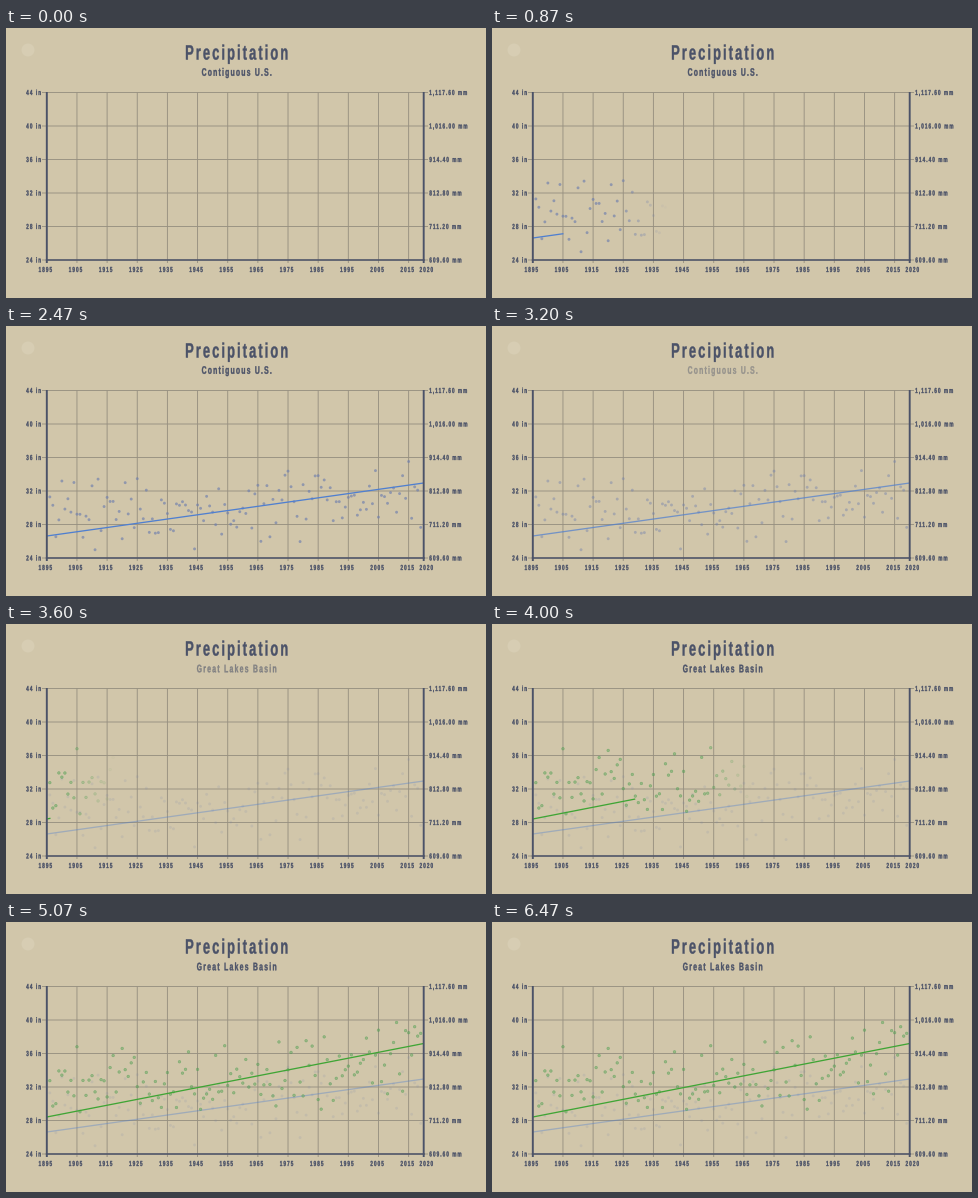
These frames come from a looping animation (480 px wide and 270 px high, 7.39 s). A matplotlib script:

```python
import numpy as np
import matplotlib.pyplot as plt
from matplotlib.animation import FuncAnimation
from matplotlib.colors import to_rgb
from matplotlib.patches import Circle, PathPatch
from matplotlib.path import Path
from matplotlib.textpath import TextPath

W, H, DPI = 480, 270, 100
LOOP, FRAMES = 7390, 111
STEP = LOOP / FRAMES
PX = 72 / DPI

PAPER, INK, GRID, BADGE = "#d1c6aa", "#4b5268", "#979080", "#d7cdb3"
BLUE, GREEN = "#4f7fd0", "#3fa535"
BLUE_DOT, GREEN_DOT = "#6f7fae", "#4d9f50"

FACE = dict(family="Liberation Sans", weight="bold")
CONDENSE = 0.62

LEFT, RIGHT, TOP, BOTTOM = 40.8, 417.7, 64.5, 232.0
YEAR = (RIGHT - LEFT) / 125
ERAS = [1896, 1935, 1970, 1995, 2019]
SECOND = 2870  # start of the second data set

fig = plt.figure(figsize=(W / DPI, H / DPI), dpi=DPI, facecolor=PAPER)
ax = fig.add_axes([0, 0, 1, 1])
ax.set(xlim=(0, W), ylim=(H, 0))
ax.axis("off")


def year_x(year):
    return LEFT + (year - 1895) * YEAR


def right_edge(s, size):
    return TextPath((0, 0), s, size=size, prop=FACE).get_extents().x1


def label(x, y, s, size, track, align=0.5):
    """Condensed, letter-spaced text on baseline y."""
    verts, codes = [], []
    for i, ch in enumerate(s):
        if ch == " ":
            continue
        glyph = TextPath((0, 0), ch, size=size, prop=FACE)
        start = right_edge(s[:i + 1], size) - right_edge(ch, size)
        shift = start * CONDENSE + i * track * size
        verts.append(glyph.vertices * [CONDENSE, -1] + [shift, 0])
        codes.append(glyph.codes)
    path = Path(np.concatenate(verts), np.concatenate(codes))
    box = path.get_extents()
    path.vertices += [x - box.x0 - align * box.width, y]
    return ax.add_patch(PathPatch(path, fc=INK, ec=INK, lw=0.35 * PX,
                                  zorder=5, snap=False))


def rule(x0, y0, x1, y1, color=GRID, width=0.9, z=1):
    ax.plot([x0, x1], [y0, y1], color=color, lw=width * PX, zorder=z,
            solid_capstyle="butt", snap=False)


def draw_scale():
    for inches in range(24, 45, 4):
        y = BOTTOM - (inches - 24) * (BOTTOM - TOP) / 20
        rule(36, y, 422, y)
        label(34.8, y + 2.5, f"{inches} in", 7.3, 0.155, 1)
        label(423.5, y + 2.5, f"{inches * 25.4:,.2f} mm", 7.3, 0.155, 0)
    for year in range(1895, 2016, 10):
        x = year_x(year)
        rule(x, TOP, x, 235)
        label(x - 1.4, 244, str(year), 7.3, 0.155)
    label(420.3, 244, "2020", 7.3, 0.155)
    for x in (LEFT, RIGHT):
        rule(x, TOP - 0.5, x, 235, INK, 1.9, 4)
    rule(LEFT - 1, BOTTOM, RIGHT + 1, BOTTOM, INK, 1.5, 4)


def rainfall(seed, means, spread):
    """Random yearly heights around a drifting mean."""
    years = np.arange(ERAS[0], ERAS[-1] + 1)
    noise = np.random.default_rng(seed).normal(0, spread, len(years))
    noise = np.clip(noise, -2.3 * spread, 2.3 * spread)
    return year_x(years), np.interp(years, ERAS, means) + noise


def ease(u):
    u = np.clip(u, 0, 1)
    return (u + u * u * (3 - 2 * u)) / 2


class Series:
    def __init__(self, points, trend, color, dot, delay, ring, z):
        self.x, y = points
        self.trend, self.delay = trend, delay
        size = 2.6 if ring else 2.9
        self.dots = ax.scatter(self.x, y, s=(size * PX) ** 2,
                               linewidths=0.6 * PX if ring else 0, zorder=z)
        self.fill, self.edge = (0.42, 0.55) if ring else (0.66, 0)
        self.rgb = to_rgb(dot)
        self.line, = ax.plot([], [], color=color, lw=1.3 * PX, zorder=z + 0.5,
                             solid_capstyle="butt", snap=False)

    def tint(self, alpha):
        return [(*self.rgb, a) for a in alpha]

    def update(self, t, dot_level=1, line_level=1):
        t -= self.delay
        front = np.interp(t, [580, 870, 1330, 1730], [40, 178, 325, 475])
        shown = np.clip((front - self.x) / 50, 0, 1) * dot_level
        self.dots.set_facecolor(self.tint(shown * self.fill))
        self.dots.set_edgecolor(self.tint(shown * self.edge))
        p = ease((t - 700) / 1360)
        y0, y1 = self.trend
        self.line.set_data([LEFT, LEFT + p * (RIGHT - LEFT)],
                           [y0, y0 + p * (y1 - y0)])
        self.line.set_alpha(line_level)
        self.line.set_visible(p > 0)


ax.add_patch(Circle((22, 22), 6.5, fc=BADGE, lw=0))
draw_scale()
label(230.7, 31.6, "Precipitation", 20.8, 0.1)
nation_name = label(230.6, 47.8, "Contiguous U.S.", 10.9, 0.115)
lakes_name = label(230.6, 48.3, "Great Lakes Basin", 10.9, 0.12)
nation = Series(rainfall(4, [182, 191, 179, 172, 163], 17), (210, 157),
                BLUE, BLUE_DOT, 0, False, 2)
lakes = Series(rainfall(11, [158, 166, 150, 148, 118], 19), (195, 121.5),
               GREEN, GREEN_DOT, SECOND, True, 3)


def update(i):
    t = i * STEP
    fade = np.interp(t, [SECOND, 3600], [0, 1])
    nation.update(t, 1 - 0.8 * fade, 1 - 0.62 * fade)
    lakes.update(t)
    nation_name.set_alpha(np.interp(t, [2930, 3350], [1, 0]))
    lakes_name.set_alpha(np.interp(t, [3380, 3800], [0, 1]))
    return []


anim = FuncAnimation(fig, update, frames=FRAMES, interval=STEP, repeat=True,
                     repeat_delay=0, blit=False)
plt.show()
```
